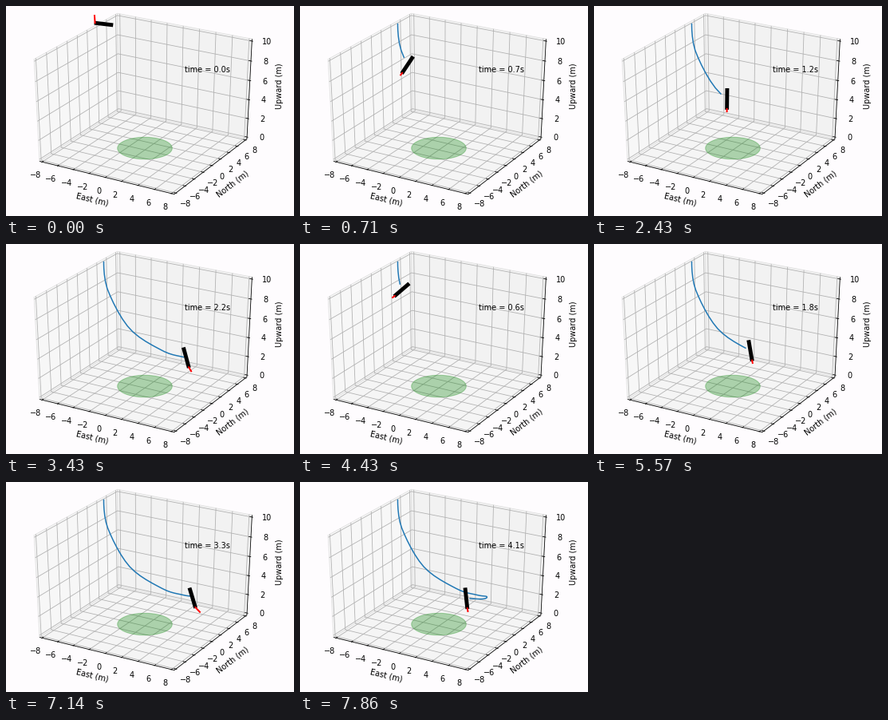
Recreate the animation shown at these times as a matplotlib script. Size 361 by 263 pixels, loop 8000 ms.

```python
import numpy as np
import matplotlib.pyplot as plt
from matplotlib.animation import FuncAnimation

W, H, DPI = 361, 263, 64
FRAMES, INTERVAL = 160, 50
RATE = 7                 # picture changes per second
PT = 72 / DPI            # points per pixel
FONT = 9.75 * PT

plt.rcParams["font.family"] = "DejaVu Sans"
fig = plt.figure(figsize=(W / DPI, H / DPI), dpi=DPI, facecolor="#fefcfe")
ax = fig.add_axes([0, 0, 1, 1])
ax.set_xlim(0, W)
ax.set_ylim(H, 0)
ax.axis("off")


def project(p):
    """Perspective view (elev 30, azim -60) of the unit cube, in pixels."""
    x, y, z = np.asarray(p, float).T
    c = np.sqrt(3) / 2
    right = c * x + 0.5 * y
    up = -0.25 * x + c / 2 * y + c * z
    near = c / 2 * x - 0.75 * y + 0.5 * z
    f = 10 / (10 - near)
    return 174 + 195 * right * f, 118.6 - 146 * up * f


def line3(points, color, z):
    ax.plot(*project(points), color=color, lw=0.8 * PT, zorder=z,
            solid_capstyle="butt")


def label(x, y, s, **kw):
    ax.text(x, y, s, fontsize=FONT, ha="center", va="center", **kw)


def label3(p, dx, dy, s):
    x, y = project([p])
    label(x[0] + dx, y[0] + dy, s)


def norm(v, lo, hi):
    """Data value to cube coordinate, with a small margin at both ends."""
    return ((v - lo) / (hi - lo) - 0.5) * 0.96


def draw_scene():
    a, b = -0.5, 0.5
    panes = [
        ([(a, a, a), (a, b, a), (a, b, b), (a, a, b)], "0.968"),
        ([(a, b, a), (b, b, a), (b, b, b), (a, b, b)], "0.95"),
        ([(a, a, a), (b, a, a), (b, b, a), (a, b, a)], "0.96"),
    ]
    for corners, shade in panes:
        ax.fill(*project(corners), fc=shade, ec="0.88", lw=0.8 * PT, zorder=1)
    line3([(a, a, a), (b, a, a), (b, b, a), (b, b, b)], "black", 3)

    t_in, t_out = 0.2 / 12, 0.1 / 12
    for v in range(-8, 9, 2):
        s = norm(v, -8, 8)
        text = str(v).replace("-", "\u2212")
        line3([(s, a, a), (s, b, a), (s, b, b)], "#b0b0b0", 2)
        line3([(b, s, a), (a, s, a), (a, s, b)], "#b0b0b0", 2)
        line3([(s, a - t_out, a), (s, a + t_in, a)], "black", 3)
        line3([(b + t_out, s, a), (b - t_in, s, a)], "black", 3)
        label3((s, a - 0.088, a - 0.088), 0.5, 0, text)
        label3((b + 0.078, s, a - 0.083), -1, 0.5, text)
    for v in range(0, 11, 2):
        s = norm(v, 0, 10)
        line3([(a, a, s), (a, b, s), (b, b, s)], "#b0b0b0", 2)
        line3([(b + t_out, b, s), (b - t_in, b, s)], "black", 3)
        label3((b + 0.073, b + 0.073, s), -0.5, 3, v)

    label(108, 242.3, "East (m)", rotation=-13.5)
    label(284.5, 222.5, "North (m)", rotation=37.5)
    label(343.5, 100.5, "Upward (m)", rotation=90)

    # landing zone, 3 m radius
    q = np.linspace(0, 2 * np.pi, 121)
    r = 3 / 16 * 0.96
    disc = np.c_[r * np.cos(q), r * np.sin(q), np.full_like(q, norm(0, 0, 10))]
    ax.fill(*project(disc), color="green", alpha=0.3, lw=PT, zorder=4)


# centre x, y and tilt from upright (deg), one row every GAP seconds
GAP = 0.6
KEYS = np.array([
    (122.5, 22.5, 96), (127.5, 57.5, 53), (155, 106, 9), (196, 133.5, -11),
    (222, 141.5, -16), (234, 143.5, -20), (229, 146.5, -16), (204, 145.5, -5),
])
SLOPES = np.gradient(KEYS, GAP, axis=0)
SLOPES[0] = 0            # starts at rest

# each flight: start in seconds, pace along the shared path
FLIGHTS = [(0, 1.15), (1.15, 1.15), (3.75, 1)]


def pose(t):
    """Cubic Hermite curve through the keys: x, y, tilt."""
    t = np.asarray(t, float)
    i = np.clip((t / GAP).astype(int), 0, len(KEYS) - 2)
    u = (t / GAP - i)[..., None]
    ease = u * u * (3 - 2 * u)
    curve = (KEYS[i] * (1 - ease) + KEYS[i + 1] * ease
             + GAP * u * (1 - u) * ((1 - u) * SLOPES[i] - u * SLOPES[i + 1]))
    return np.moveaxis(curve, -1, 0)


def heading(deg):
    """Screen direction of the nose at a tilt."""
    a = np.radians(deg)
    return np.array([np.sin(a), -np.cos(a)])


draw_scene()
trail, = ax.plot([], [], color="#1f77b4", lw=1.5 * PT, zorder=5)
body, = ax.plot([], [], color="black", lw=4.9 * PT, zorder=6,
                solid_capstyle="butt")
flame, = ax.plot([], [], color="red", lw=2 * PT, zorder=7,
                 solid_capstyle="projecting")
clock = ax.text(224.5, 83, "", fontsize=FONT, zorder=8)


def update(n):
    now = int((n + 0.9) * INTERVAL / 1000 * RATE) / RATE
    start, pace = [f for f in FLIGHTS if now >= f[0]][-1]
    step = int((now - start) * 10 + 1e-6)
    t = pace * step / 10

    x, y, _ = pose(pace * np.arange(step) / 10)
    trail.set_data(x, y)

    x, y, tilt = pose(t)
    mid = np.array([x, y])
    half = heading(tilt) * (11.8, 13.4)
    body.set_data(*np.c_[mid - half, mid + half])

    # a kick at ignition, a long burn where the craft turns back
    kick, burn = np.exp(-30 * t), np.exp(-((t - 3.1) / 0.7) ** 2)
    tail = mid - 0.93 * half
    jet = (3.2 + 5.3 * burn + 6 * kick) * heading(tilt - 27 * burn + 80 * kick)
    flame.set_data(*np.c_[tail, tail - jet])
    clock.set_text(f"time = {step / 10:.1f}s")
    return trail, body, flame, clock


anim = FuncAnimation(fig, update, frames=FRAMES, interval=INTERVAL,
                     repeat=True, repeat_delay=0)
plt.show()
```
